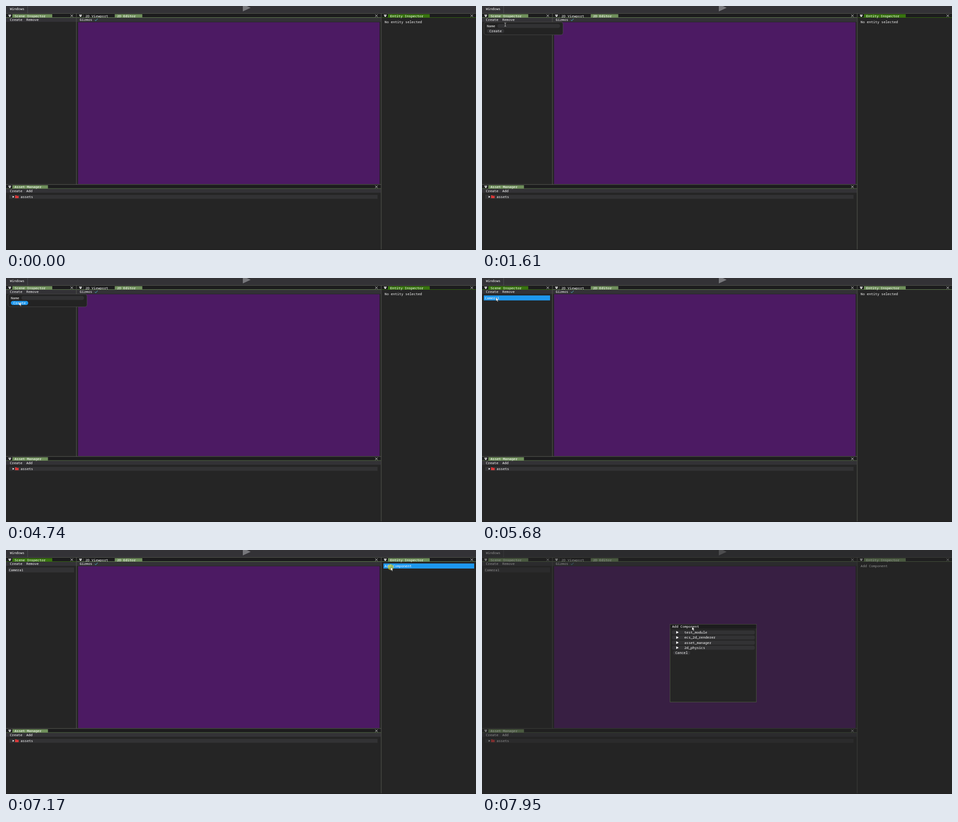
Animation of 1036 by 540 pixels, one loop 8 s. Source, as an HTML page:

```html
<!DOCTYPE html>
<html lang="en">
<head>
<meta charset="utf-8">
<title>Scene editor</title>
<style>
  html, body { margin: 0; width: 100%; height: 100%; overflow: hidden; background: #252525; }
  svg { display: block; width: 1036px; height: 540px; }
  text { font: 7.63px "Noto Sans Mono", "DejaVu Sans Mono", monospace; fill: #fff; white-space: pre; }
</style>
</head>
<body>
<svg id="stage" viewBox="0 0 1036 540" xmlns="http://www.w3.org/2000/svg"></svg>
<script>
const LOOP = 8000, CHAR = 4.58;
const C = {
  bg: '#252525', bar: '#333236', tabs: '#1c1c1d', row: '#323234', line: '#61655a',
  idle: '#6f8f5b', focus: '#38740f', blue: '#1e98ee', purple: '#4c1a63'
};
const stage = document.getElementById('stage');

function add(parent, tag, attrs, content) {
  const node = document.createElementNS(stage.namespaceURI, tag);
  for (const key in attrs) node.setAttribute(key, attrs[key]);
  if (content) node.textContent = content;
  parent.appendChild(node);
  return node;
}
const group = parent => add(parent, 'g', {});
const rect = (p, x, y, width, height, fill, rx = 0) => add(p, 'rect', { x, y, width, height, fill, rx });
const path = (p, d, attrs) => add(p, 'path', { d, fill: 'none', ...attrs });
const label = (p, x, middle, content) => add(p, 'text', { x, y: middle + 2.6 }, content);
const show = (node, on) => node.setAttribute('display', on ? 'inline' : 'none');
const fill = (node, color) => node.setAttribute('fill', color);

// Title strip of a docked window; returns the parts coloured by focus.
function titleBar(x, y, width, tabX, tabWidth, title) {
  rect(ui, x, y, width, 9, C.tabs);
  const parts = [rect(ui, x, y + 8.2, width, 0.9, C.idle), rect(ui, tabX, y + 1.3, tabWidth, 7.5, C.idle)];
  path(ui, `M${x + 5.3} ${y + 2.3}h6v1.2h-6zM${x + 5.3} ${y + 4.3}h6l-3 3.3z`, { fill: '#fff' });
  const cx = x + width - 10;
  path(ui, `M${cx - 2.7} ${y + 2}l5.4 5.4m0 -5.4l-5.4 5.4`, { stroke: '#eee', 'stroke-width': 0.9 });
  label(ui, tabX + 4.8, y + 5.1, title);
  return parts;
}
const setFocus = (parts, on) => parts.forEach(part => fill(part, on ? C.focus : C.idle));

const ui = group(stage);
rect(ui, 0, 0, 1036, 540, C.bg);

// Main menu
rect(ui, 0, 0, 1036, 16, C.bar);
rect(ui, 47.3, 0, 0.9, 16, '#55555a');
label(ui, 8.5, 6.3, 'Windows');
path(ui, 'M522 -4L539.3 4L522 12z', { fill: '#77777b' });

// Docked windows
const sceneTitle = titleBar(0, 16.8, 155, 14, 88, 'Scene Inspector');
titleBar(156, 16.8, 670.5, 240, 60.5, '2D Editor');
rect(ui, 239.3, 18, 0.8, 7, '#4a4f45');
rect(ui, 170, 18, 0.8, 7, '#4a4f45');
label(ui, 175, 21.9, '2D Viewport');
const entityTitle = titleBar(827.7, 16.8, 209, 842, 92, 'Entity Inspector');
titleBar(0, 395.4, 826.5, 14, 78.5, 'Asset Manager');

rect(ui, 0, 26, 155, 9, C.bar);
rect(ui, 156, 26, 670, 9, C.bar);
rect(ui, 0, 404.6, 826, 8.7, C.bar);
label(ui, 8.5, 30.7, 'Create');
const remove = label(ui, 44.7, 30.7, 'Remove');
label(ui, 162.6, 30.7, 'Gizmos');
path(ui, 'M195.8 30.6l2 2.2l4.2 -4.6', { stroke: '#4a97ac', 'stroke-width': 1.1 });
label(ui, 8.5, 409.2, 'Create');
label(ui, 44.7, 409.2, 'Add');

rect(ui, 159, 36, 664.5, 358, C.purple);
rect(ui, 0, 16.2, 1036, 0.8, C.line);
rect(ui, 0, 394.6, 827, 0.9, C.line);
rect(ui, 154.7, 17, 0.9, 378, C.line);
rect(ui, 826.6, 17, 0.9, 523, C.line);
rect(ui, 0, 538.6, 1036, 1.4, '#1f1f1f');

// Asset tree
rect(ui, 7, 418, 812, 8.7, C.row);
path(ui, 'M14.6 420.2L18.2 422.3L14.6 424.4z', { fill: '#fff' });
path(ui, 'M20 419h3l0.8 0.9h4v5.4h-7.8z', { fill: '#e23b3b' });
path(ui, 'M20 421h7.8', { stroke: '#9c2226', 'stroke-width': 0.6 });
label(ui, 32.2, 422.7, 'assets');

// Entity row and inspector content
const entityRow = group(ui);
const rowBox = rect(entityRow, 4, 38.6, 146, 11, C.row);
label(entityRow, 6.3, 44.3, 'Camera1');
const addBox = rect(ui, 832, 29.8, 200, 11.2, C.blue);
const inspectorText = label(ui, 834.6, 35.7, ' ');

// Popup for naming a new entity
const popup = group(stage);
add(popup, 'rect', { x: 4.4, y: 35.6, width: 174.2, height: 28.2, rx: 5, fill: '#232323', stroke: '#505050', 'stroke-width': 0.8 });
label(popup, 10.8, 44.3, 'Name');
rect(popup, 34, 39.8, 138, 8.6, C.row, 4.3);
const nameText = label(popup, 38.8, 44.3, ' ');
const caret = rect(popup, 0, 40.2, 0.8, 7.8, '#fff');
const createButton = rect(popup, 10.8, 50.8, 38.2, 9, C.row, 4.5);
label(popup, 16, 55.6, 'Create');

// Modal with dimmed background
const dim = rect(stage, 0, 0, 1036, 540, C.bg);
const modal = group(stage);
add(modal, 'rect', { x: 414.4, y: 164.4, width: 190.4, height: 172.2, fill: C.bg, stroke: '#566146', 'stroke-width': 0.8 });
rect(modal, 414.8, 164.8, 189.6, 8.6, C.tabs);
label(modal, 419, 169.2, 'Add Component');
['test_module', 'ecs_2d_renderer', 'asset_manager', '2d_physics'].forEach((name, i) => {
  const y = 182.3 + i * 11.35;
  rect(modal, 418.5, y - 4.4, 183, 8.8, C.row, 4);
  path(modal, `M428.2 ${y - 3}L433.6 ${y}L428.2 ${y + 3}z`, { fill: '#fff' });
  label(modal, 446, y + 0.2, name);
});
rect(modal, 421, 223.2, 38, 8.8, C.row, 4.4);
label(modal, 426, 227.8, 'Cancel');

// Pointer
const pointer = group(stage);
const halo = add(pointer, 'circle', { r: 6.4, fill: '#e4d010', opacity: 0.62 });
const arrow = path(pointer, 'M0 0V7.6L1.8 6L3.1 8.9L4.5 8.3L3.2 5.5H5.6z',
  { fill: '#fff', stroke: '#111', 'stroke-width': 0.4 });
const beam = path(pointer, 'M-2 -3.6Q0 -3.6 0 -2.6Q0 -3.6 2 -3.6M0 -2.8V3.2M-2 4Q0 4 0 3Q0 4 2 4',
  { stroke: '#ddd', 'stroke-width': 0.8 });

// Pointer stops: time, x, y
const stops = [
  [210, 899, 491], [750, 18, 25.5], [840, 18, 25.5], [910, 18, 27], [980, 24, 31], [1300, 24, 31],
  [1690, 54, 42], [3890, 54, 42], [4270, 29, 53.5], [4890, 29, 53.5], [5130, 37, 75],
  [5450, 37, 75], [5680, 31, 43.5], [6150, 31, 43.5], [6540, 330, 85], [7020, 848, 38],
  [7330, 848, 38], [7950, 463, 170]
];
const clicks = [[1140, 1300], [1840, 2000], [4500, 4740], [5210, 5370], [5840, 5920], [7170, 7330]];
const keys = [2710, 2940, 3020, 3170, 3250, 3330, 3570];

function pointerAt(t) {
  const next = stops.findIndex(stop => stop[0] > t);
  if (next < 0) return stops[stops.length - 1].slice(1);
  if (next === 0) return stops[0].slice(1);
  const [t0, x0, y0] = stops[next - 1], [t1, x1, y1] = stops[next];
  const u = (t - t0) / (t1 - t0), k = u * u * (3 - 2 * u);
  return [x0 + (x1 - x0) * k, y0 + (y1 - y0) * k];
}

function draw(t) {
  const between = (from, to) => t >= from && t < to;
  // The pointer is sampled at a fixed rate, so it moves in hard steps.
  const sampled = 210 + Math.floor((t - 198) / 78.18) * 78.18;
  const [x, y] = pointerAt(sampled);
  const popupOpen = between(1220, 5290), modalOpen = t >= 7250, selected = t >= 5920;

  setFocus(sceneTitle, between(5290, 7250));
  setFocus(entityTitle, t < 5290);
  fill(remove, selected ? '#fff' : '#858587');
  show(entityRow, t >= 4740);
  fill(rowBox, t >= 5290 && x < 150 && y > 38 && y < 50 ? C.blue : C.row);
  inspectorText.textContent = selected ? 'Add Component' : 'No entity selected';
  show(addBox, selected && !modalOpen && x > 832 && y < 41);

  show(popup, popupOpen);
  const typed = t < 4740 ? keys.filter(key => t >= key).length : 0;
  nameText.textContent = 'Camera1'.slice(0, typed);
  caret.setAttribute('x', 39 + typed * CHAR);
  show(caret, between(1840, 4500));
  fill(createButton, popupOpen && x < 49 && y > 50.8 && y < 60 ? C.blue : C.row);

  dim.setAttribute('opacity', 0.5 * Math.max(0, Math.min(1, (sampled - 7170) / 180)));
  show(modal, modalOpen);

  show(pointer, t >= 210);
  pointer.setAttribute('transform', `translate(${x.toFixed(2)} ${y.toFixed(2)})`);
  show(halo, clicks.some(([from, to]) => between(from, to)));
  const overField = popupOpen && x > 34 && y > 39.8 && y < 48.4;
  show(arrow, !overField);
  show(beam, overField);
}

const start = performance.now();
function tick() {
  draw((performance.now() - start) % LOOP);
  requestAnimationFrame(tick);
}
tick();
</script>
</body>
</html>
```
